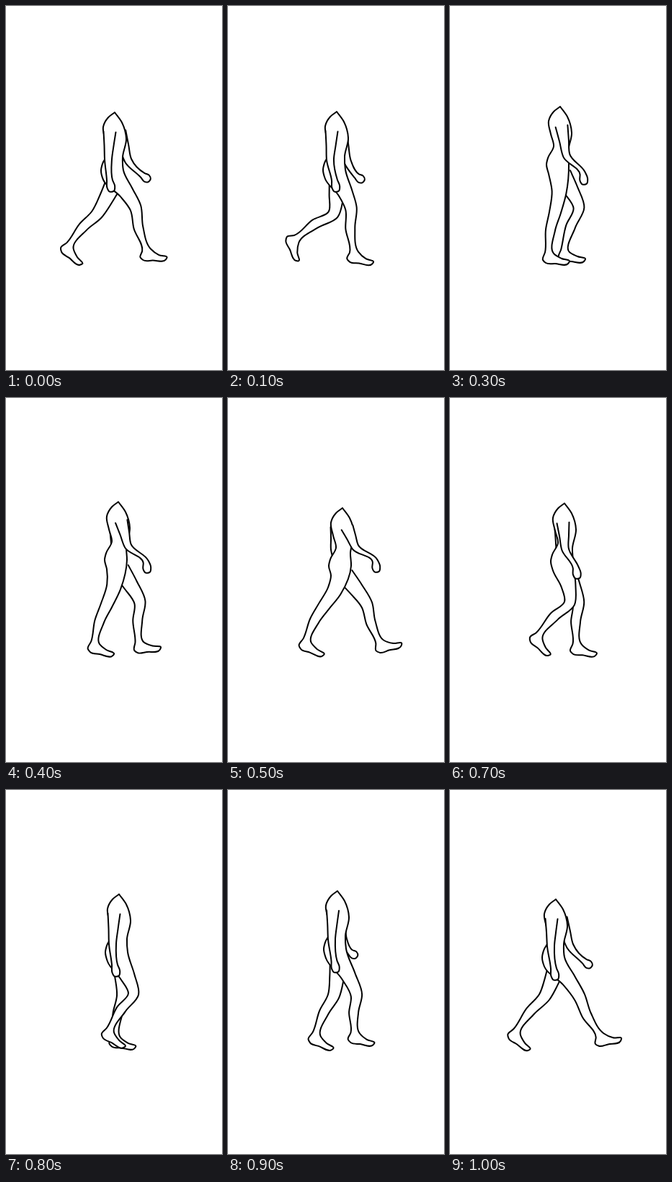
An HTML page for the animation above (1.1 s loop, 300x503 px).

```html
<!DOCTYPE html>
<html lang="en">
<head>
<meta charset="utf-8">
<title>Walk cycle</title>
<style>
  html, body { margin: 0; width: 100%; height: 100%; overflow: hidden; background: #fff; }
  svg { display: block; width: 100%; height: 100%; }
  path { fill: #fff; stroke: #000; stroke-width: 2; stroke-linecap: round; stroke-linejoin: round; }
</style>
</head>
<body>
<svg id="stage" viewBox="0 0 300 503"></svg>
<script>
const STEP = 100, STEPS = 11;

// Fixed shapes: the torso hangs from the neck, the foot from the ankle.
const BACK = [[0, 0], [-9, 7], [-16, 20], [-13, 38], [-9, 55], [-17, 71], [-19, 80], [-16, 93]];
const FRONT = [[12, 80], [11, 62], [16, 36], [10, 14], [0, 0]];
const FOOT = [[-9, 10], [-5, 14], [8, 15], [26, 15], [28, 12], [17, 8]];
const HIP = [2, 91];
const NEAR_HAND = [3, 15], FAR_HAND = [9, 7];

const add = ([x, y], [dx, dy]) => [x + dx, y + dy];
const mean = (a, b) => a.map((v, i) => (v + b[i]) / 2);

// Point at fraction f of the bone a-b, moved w towards its front side.
function at(a, b, f, w) {
  const dx = b[0] - a[0], dy = b[1] - a[1], length = Math.hypot(dx, dy);
  return [a[0] + dx * f + dy / length * w, a[1] + dy * f - dx / length * w];
}

// Outline of a bent joint lies midway between the edges of its two bones.
const bend = (a, joint, b, w) => mean(at(a, joint, 1, w), at(joint, b, 0, w));

function foot(ankle, tilt) {
  const c = Math.cos(tilt * Math.PI / 180), s = Math.sin(tilt * Math.PI / 180);
  return FOOT.map(([x, y]) => add(ankle, [x * c - y * s, x * s + y * c]));
}

function leg(hip, [kx, ky, ax, ay, tilt]) {
  const knee = [kx, ky], ankle = [ax, ay];
  const side = (thigh, joint, calf, end) => [
    at(hip, knee, 0.5, thigh), bend(hip, knee, ankle, joint),
    at(knee, ankle, 0.45, calf), at(knee, ankle, 1, end)
  ];
  return [...side(-9, -8, -9.5, -6), ...foot(ankle, tilt), ...side(11, 8, 3.5, 6).reverse()];
}

function wholeLeg(hip, joints) {
  const knee = joints.slice(0, 2);
  return [at(hip, knee, 0.05, -12), ...leg(hip, joints), at(hip, knee, 0.05, 12)];
}

// The shoulder follows the swing of the elbow.
function arm(neck, [ex, ey, wx, wy], hand) {
  const elbow = [ex, ey], wrist = [wx, wy], tip = add(wrist, hand);
  const shoulder = add(neck, [(ex - neck[0]) / 2 - 2.5, 27]);
  const side = s => [
    at(shoulder, elbow, 0, 8.5 * s), at(shoulder, elbow, 0.5, 6.5 * s),
    bend(shoulder, elbow, wrist, 5 * s), bend(elbow, wrist, tip, 4 * s),
    at(wrist, tip, 0.6, 5.5 * s), at(wrist, tip, 1, 3 * s)
  ];
  return [...side(-1), ...side(1).reverse()];
}

// Outlines from back to front.
function figure({ neck, nearLeg, farLeg, nearArm, farArm }) {
  const place = shape => shape.map(p => add(neck, p));
  const hip = add(neck, HIP);
  return [
    arm(neck, farArm, FAR_HAND),
    wholeLeg(hip, farLeg),
    [...place(BACK), ...leg(hip, nearLeg), ...place(FRONT)],
    arm(neck, nearArm, NEAR_HAND)
  ];
}

// Legs: knee, ankle, tilt of the foot. Arms: elbow, wrist.
const poses = [];
function key(step, neck, nearLeg, farLeg, nearArm, farArm) {
  poses[step] = { neck, nearLeg, farLeg, nearArm, farArm };
}

// Blend of the neighbouring poses with the upper body raised.
function between(step, rise) {
  const a = poses[step - 1], b = poses[step + 1];
  const blend = name => mean(a[name], b[name]);
  const lift = name => blend(name).map((v, i) => i % 2 ? v - rise : v);
  key(step, lift("neck"), blend("nearLeg"), blend("farLeg"), lift("nearArm"), lift("farArm"));
}

key(0, [151, 147], [180, 279, 195, 337, -3], [126, 288, 89, 331, 33], [142, 212, 144, 241], [170, 214, 190, 234]);
key(1, [151, 146], [171, 280, 175, 340, 4], [146, 288, 95, 322, 61], [142, 213, 148, 241], [166, 215, 179, 235]);
key(3, [153, 139], [146, 285, 138, 341, 0], [179, 279, 160, 338, 0], [162, 207, 184, 231], [155, 207, 150, 228]);
key(5, [159, 152], [133, 288, 110, 335, 16], [193, 286, 211, 337, -19], [177, 206, 204, 225], [148, 210, 152, 225]);
key(6, [161, 149], [155, 285, 103, 325, 49], [195, 282, 200, 339, 2], [172, 206, 198, 228], [152, 212, 149, 252]);
key(8, [157, 144], [177, 282, 145, 332, 24], [162, 284, 153, 341, 3], [148, 213, 151, 242], [153, 212, 152, 226]);
key(10, [147, 151], [180, 286, 208, 339, -15], [131, 286, 93, 334, 30], [140, 216, 144, 247], [167, 216, 187, 237]);
between(2, 1);
between(4, 2);
between(7, 1);
between(9, 8);

// Smooth curve through the points; tight turns stay sharp.
function curve(points) {
  const segments = points.slice(1).map(([x, y], i) => {
    const dx = x - points[i][0], dy = y - points[i][1];
    const length = Math.hypot(dx, dy) || 1;
    return { length, x: dx / length, y: dy / length };
  });
  const tangents = points.map((_, i) => {
    const a = segments[i - 1] || segments[i], b = segments[i] || a;
    const k = b.length / (a.length + b.length);
    return [a.x * k + b.x * (1 - k), a.y * k + b.y * (1 - k)];
  });
  const handle = (n, reach) =>
    points[n].map((v, axis) => (v + tangents[n][axis] * reach).toFixed(2));
  return segments.reduce((d, { length }, i) =>
    d + `C${handle(i, length / 3)} ${handle(i + 1, -length / 3)} ${points[i + 1]}`, "M" + points[0]);
}

const stage = document.getElementById("stage");
const drawings = poses.map(pose => figure(pose).map(curve));
const paths = drawings[0].map(() =>
  stage.appendChild(document.createElementNS("http://www.w3.org/2000/svg", "path")));

function draw(time) {
  const step = Math.floor(time / STEP) % STEPS;
  paths.forEach((path, i) => path.setAttribute("d", drawings[step][i]));
}

const start = performance.now();
function tick() {
  draw(performance.now() - start);
  requestAnimationFrame(tick);
}
tick();
</script>
</body>
</html>
```
